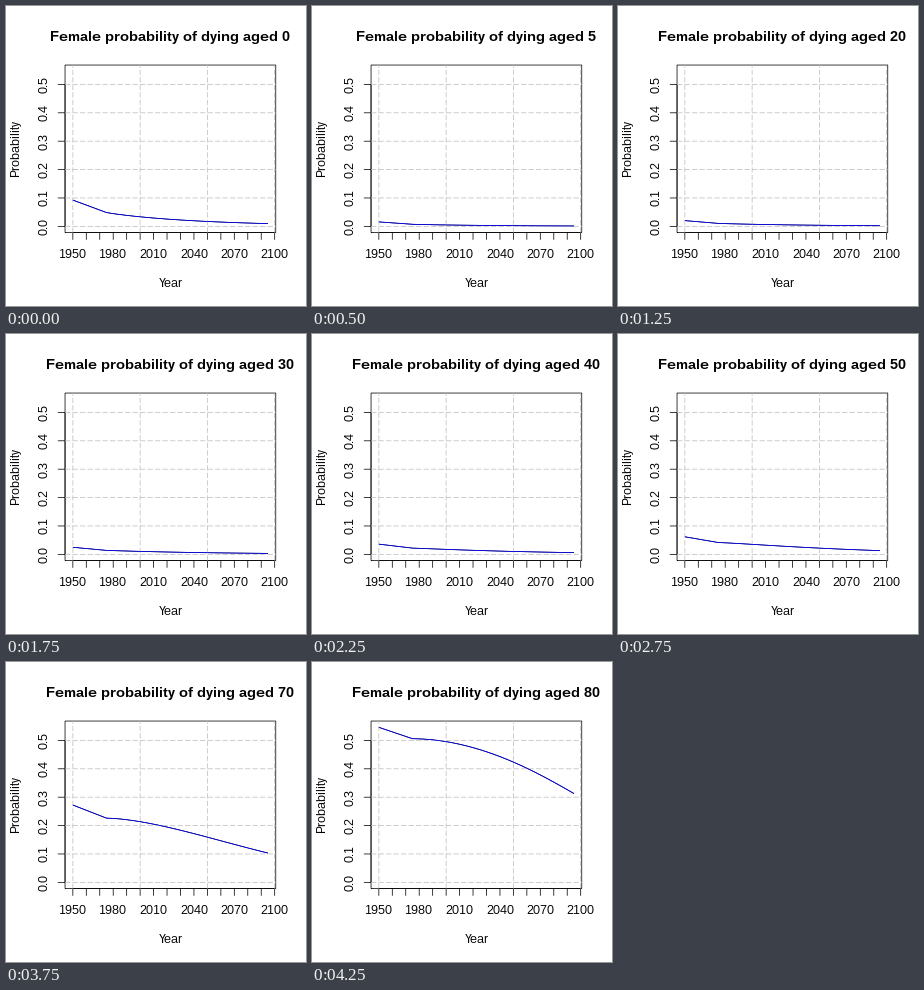
Recreate the animation shown at these times as a matplotlib script. Size 300 by 300 pixels, loop 4.5 s.

```python
import matplotlib.pyplot as plt
import numpy as np
from matplotlib.animation import FuncAnimation

plt.rcParams.update({
    "font.family": "Liberation Sans",
    "text.hinting": "native",
    "text.hinting_factor": 1,
    "lines.linewidth": 0.75,
    "lines.solid_capstyle": "butt",
    "lines.scale_dashes": False,
    "path.snap": False,
})

SIZE = 300
LEFT, RIGHT, TOP, BOTTOM = 59.04, 269.76, 59.04, 226.56
CENTER_X, CENTER_Y = (LEFT + RIGHT) / 2, (TOP + BOTTOM) / 2
TICK = 7.2
AGES = [0, 1, *range(5, 81, 5)]
YEARS = np.arange(1950, 2096, 5)


def x_px(year):
    return 66.84 + (year - 1950) * 1.3456


def y_px(prob):
    return 220.36 - prob * 283.9


def logistic(z):
    return 1 / (1 + np.exp(-z))


def logit(p):
    return np.log(p / (1 - p))


def mortality(age, infant, level, slope):
    """Infant deaths fading out, plus a logistic rise towards age 80."""
    u = (80 - age) / 20
    adult = logistic(level - slope * u + 0.4 * u ** 2)
    return infant * np.exp(-age / 1.5) + adult * (1 - np.exp(-age / 7))


def death_rates(age):
    """Straight fall until 1975, then an eased fall in log odds."""
    first = mortality(age, 0.0926, 0.185, 2.535)
    middle = mortality(age, 0.0487, 0.024, 2.707)
    last = mortality(age, 0.0097, -0.787, 2.95)
    early = first + (middle - first) * (YEARS - 1950) / 25
    t = np.clip((YEARS - 1975) / 120, 0, 1)
    eased = t ** (0.93 + 0.97 * (age / 80) ** 2.5)
    late = logistic(logit(middle) + (logit(last) - logit(middle)) * eased)
    return np.where(YEARS < 1975, early, late)


fig = plt.figure(figsize=(SIZE / 72, SIZE / 72), dpi=72, facecolor="white")
ax = fig.add_axes([0, 0, 1, 1])
ax.set(xlim=(0, SIZE), ylim=(SIZE, 0))
ax.axis("off")


def line(xs, ys, color="black", **style):
    return ax.plot(xs, ys, color=color, **style)[0]


def label(x, y, text, size=12, **style):
    return ax.text(x, y, text, size=size, ha="center", va="baseline",
                   rotation_mode="anchor", **style)


shadow = line([], [])

# Box, axes and ticks
line([LEFT, RIGHT, RIGHT, LEFT, LEFT], [BOTTOM, BOTTOM, TOP, TOP, BOTTOM],
     solid_joinstyle="miter")
line([x_px(1950), x_px(2100)], [BOTTOM, BOTTOM])
line([LEFT, LEFT], [y_px(0), y_px(0.5)])
for year in range(1950, 2101, 10):
    line([x_px(year)] * 2, [BOTTOM, BOTTOM + TICK])
for year in range(1950, 2101, 30):
    label(x_px(year), 252, str(year))
for prob in np.arange(6) / 10:
    line([LEFT - TICK, LEFT], [y_px(prob)] * 2)
    label(42, y_px(prob), f"{prob:.1f}", rotation=90)

label(CENTER_X, 281, "Year")
label(13, CENTER_Y, "Probability", rotation=90)
title = label(CENTER_X, 35, "", size=14.4, weight="bold")

# Grid
dashed = dict(color="#bebebe", dashes=(5.25, 2.25), dash_capstyle="butt")
for year in range(1950, 2101, 50):
    line([x_px(year)] * 2, [BOTTOM, TOP], **dashed)
for prob in np.arange(6) / 10:
    line([LEFT, RIGHT], [y_px(prob)] * 2, **dashed)

curve = line([], [], color="blue")


def update(frame):
    age = AGES[frame]
    title.set_text(f"Female probability of dying aged {age}")
    for path in (shadow, curve):
        path.set_data(x_px(YEARS), y_px(death_rates(age)))
    return title, shadow, curve


anim = FuncAnimation(fig, update, frames=len(AGES), interval=250,
                     repeat=True, repeat_delay=0)
plt.show()
```
